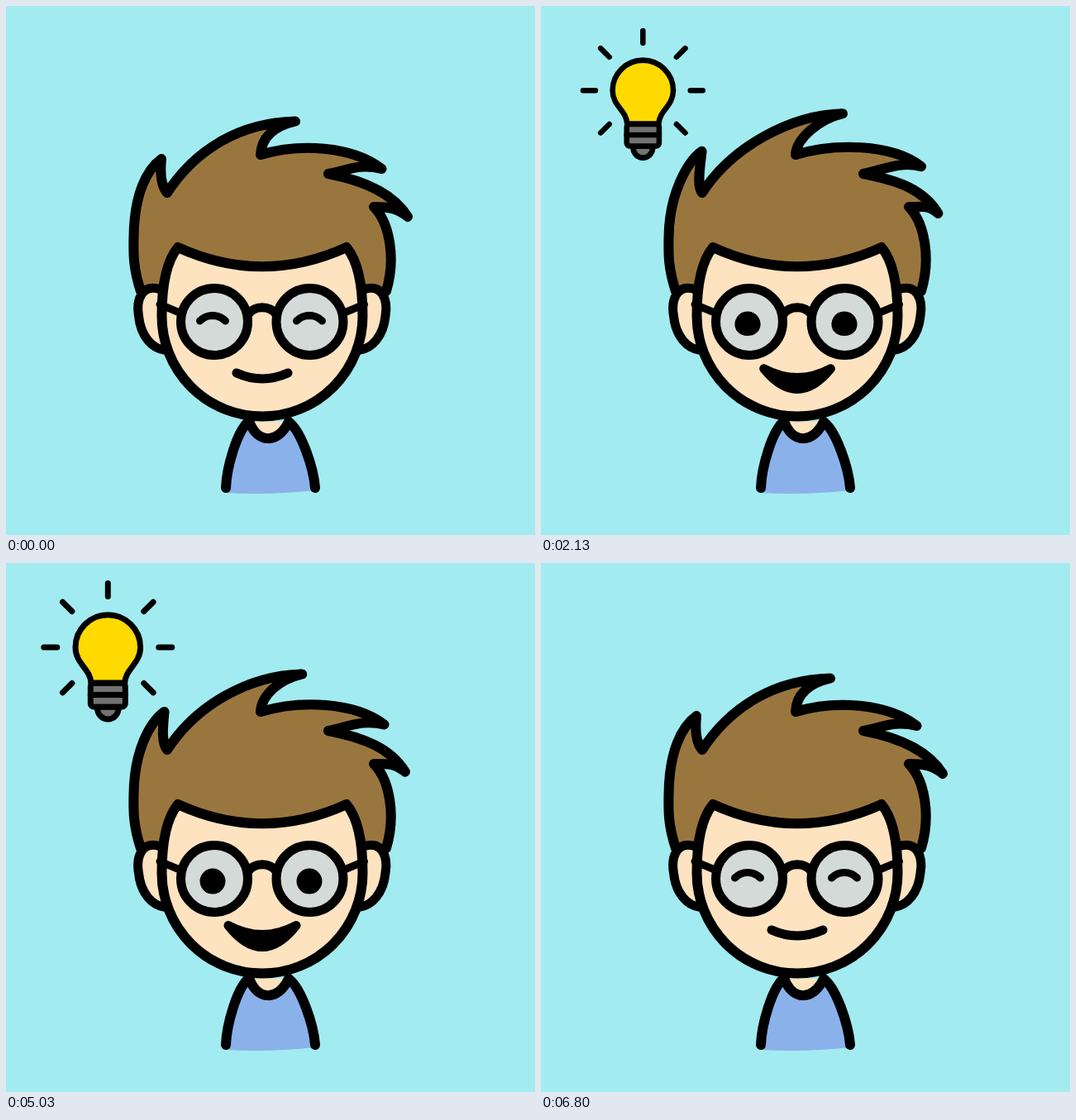
These frames come from a looping animation (640 px wide and 640 px high, 7210 ms). An HTML page:

```html
<!DOCTYPE html>
<html lang="en">
<head>
<meta charset="utf-8">
<title>Bright idea</title>
<style>
  html, body { margin: 0; width: 100%; height: 100%; overflow: hidden; background: #a2ebf0; }
  svg { display: block; width: 100%; height: 100%; }
  .ink { stroke: #000; stroke-width: 12; stroke-linecap: round; stroke-linejoin: round; }
  .skin { fill: #fde3c0; }
  .line { fill: none; }
  .medium { stroke-width: 11; }
  .fine { stroke-width: 9; }
  .thin { stroke-width: 7; }
</style>
</head>
<body>
<svg viewBox="0 0 640 640">
  <g id="body">
    <path fill="#8bb1eb" d="M293 503C279 516 267 558 266 589Q320 592 374 586C372 558 357 514 342 503Z"/>
    <path class="ink skin" d="M294 502C304 530 329 530 342 503"/>
    <path class="ink line" d="M293 503C279 516 267 558 266 583M342 503C357 514 372 558 374 583"/>
  </g>
  <path id="hair" class="ink" fill="#9a763f"/>
  <path id="ear" class="ink skin medium" d="M187 343C165 335 157 355 160.500 375C163 400 177 414 191 416"/>
  <use href="#ear" transform="translate(619.500) scale(-1 1)"/>
  <path id="head" class="ink skin" d="M208 292C193 310 188.500 340 188.500 375A121.500 121.500 0 0 0 431.500 375C431.500 340 427 310 412 292Q310 338.500 208 292Z"/>
  <g id="lens" class="ink line medium">
    <path class="fine" d="M186 361L210 371"/>
    <circle cx="252" cy="382" r="40.500" fill="#d4dad7"/>
  </g>
  <use href="#lens" transform="translate(619.500) scale(-1 1)"/>
  <path class="ink line medium" d="M293 373C301 362 319 362 327 373"/>
  <path id="eye" class="ink fine"/>
  <use href="#eye" x="117"/>
  <path id="mouth" class="ink medium"/>
  <g id="bulb" class="ink thin">
    <g id="rays"></g>
    <path fill="#ffda00" d="M-20.500 43C-21 26 -39.300 20 -39.300 0A39.300 39.300 0 0 1 39.300 0C39.300 20 21 26 20.500 43Z"/>
    <path fill="#737373" d="M-13 72C-13 92 13 92 13 72Z"/>
    <rect fill="#737373" x="-21" y="43.500" width="42" height="28.500" rx="4"/>
    <path d="M-21 57.500H21"/>
  </g>
</svg>
<script>
const LOOP = 7210;
const $ = id => document.getElementById(id);
const mix = (a, b, p) => a + (b - a) * p;

function ease(t, from, to) {
  const s = Math.min(1, Math.max(0, (t - from) / (to - from)));
  return s * s * (3 - 2 * s);
}

// Rises from 0 to 1, holds, then falls back to 0.
const pulse = (t, riseStart, riseEnd, fallStart, fallEnd) =>
  ease(t, riseStart, riseEnd) - ease(t, fallStart, fallEnd);

// Two arcs between the same corners; each sag is the arc's height at its middle.
function eyePath(open) {
  const half = mix(15.5, 9.5, open), y = mix(381, 390.5, open);
  const arc = (sag, endX) => {
    const radius = (half * half + sag * sag) / (2 * Math.abs(sag) + 0.001);
    const large = Math.abs(sag) > half ? 1 : 0;
    return `A${radius} ${radius} 0 ${large} ${sag > 0 ? 1 : 0} ${endX} ${y}`;
  };
  return `M${250 - half} ${y}` + arc(mix(6.5, 16.5, open), 250 + half) +
    arc(mix(-6.5, 5.5, open), 250 - half) + 'Z';
}

function mouthPath(open) {
  const half = mix(31, 41, open), y = mix(444, 438.5, open);
  const curve = (sag, endX) => `Q310 ${y + 2 * sag} ${endX} ${y}`;
  return `M${310 - half} ${y}` + curve(mix(7, 11, open), 310 + half) +
    curve(mix(7, 26, open), 310 - half) + 'Z';
}

// Only the tips of the locks swing; the roots between them stay put.
function hairPath(swing) {
  const lock = (dx, dy) => (x, y) => `${x + dx * swing} ${y + dy * swing} `;
  const back = lock(7, -10), crown = lock(16, -10), side = lock(6, -3), front = lock(-6, -4.5);
  return `M163 345C154 318 154 300 154.500 280C155 228 ${back(170, 198)}${back(188, 185)}` +
    `C${back(186, 205)}188 218 195 226` +
    `C230 172 ${crown(285, 141)}${crown(350, 139.5)}C${crown(322, 146)}309 160 308 180` +
    `C355 166 ${side(418, 169)}${side(454.5, 197)}C${side(428, 190)}412 199 390 203` +
    `C432 211 ${front(468, 226)}${front(486, 255)}C${front(474, 245)}463 243 445 243` +
    `C464 262 472 305 460 345`;
}

// Rays stand every 45 degrees, leaving out the one below.
for (let angle = -135; angle <= 135; angle += 45) {
  $('rays').innerHTML += `<path d="M0 -61.5V-77.5" transform="rotate(${angle})"/>`;
}

function draw(t) {
  const swing = pulse(t, 0, 1933, 1933, 3200) + pulse(t, 3200, 4333, 4333, 5750);
  const open = pulse(t, 0, 1080, 1933, 3200) + pulse(t, 3200, 4333, 5320, 6775);
  const size = pulse(t, 700, 1130, 1933, 3200) + pulse(t, 4324, 4754, 5320, 6775);
  $('hair').setAttribute('d', hairPath(swing));
  $('eye').setAttribute('d', eyePath(open));
  $('mouth').setAttribute('d', mouthPath(open));
  $('bulb').setAttribute('visibility', size > 0.004 ? 'visible' : 'hidden');
  $('bulb').setAttribute('transform', `translate(123.3 ${107 - 5 * size}) scale(${size})`);
}

const start = performance.now();
function tick() {
  draw((performance.now() - start) % LOOP);
  requestAnimationFrame(tick);
}
tick();
</script>
</body>
</html>
```
